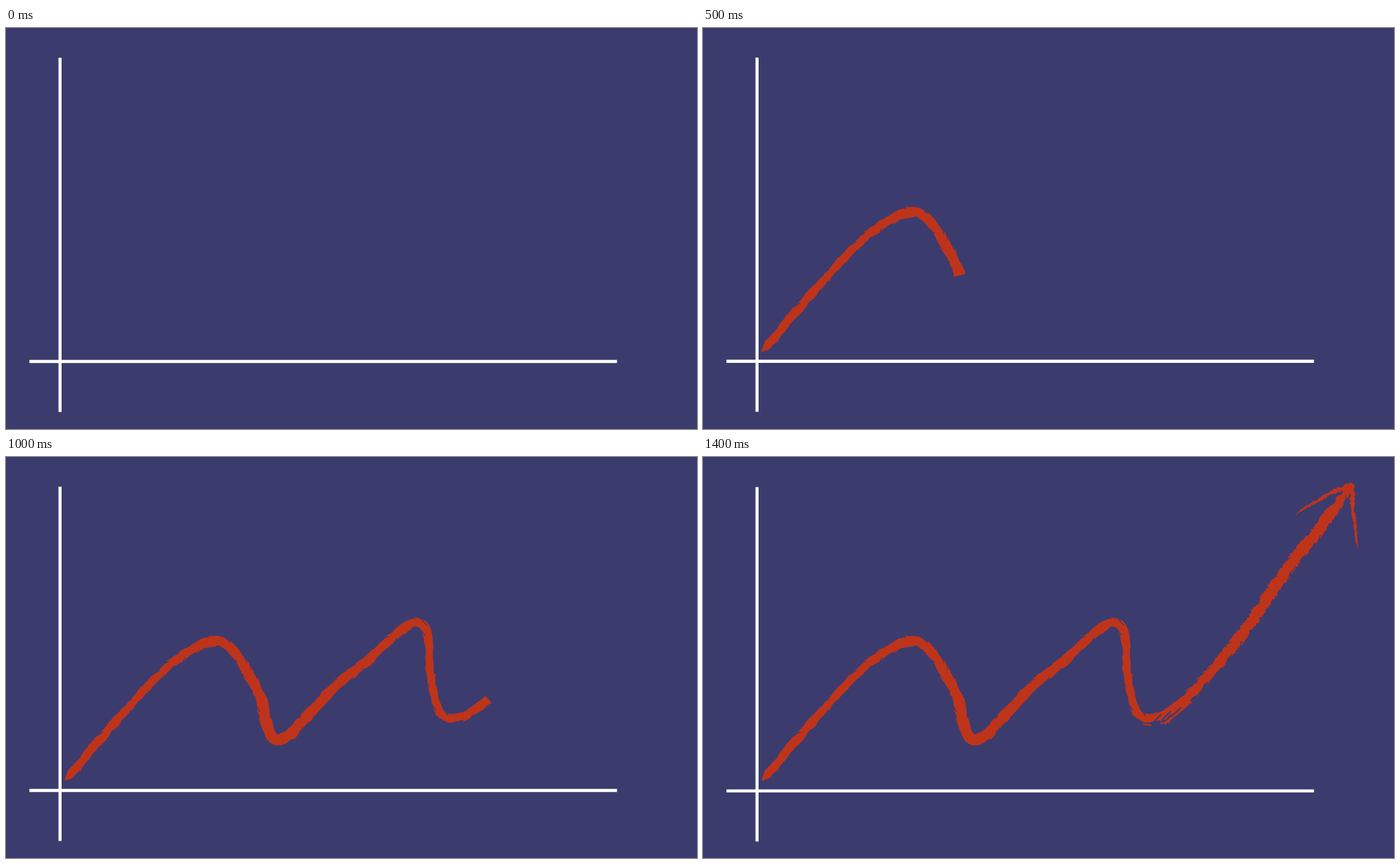
An HTML page with a canvas for the animation above (1500 ms loop, 982x570 px).

```html
<!DOCTYPE html>
<html lang="en">
<head>
<meta charset="utf-8">
<title>Rising chart</title>
<style>
  html, body { margin: 0; width: 100%; height: 100%; overflow: hidden; background: #3c3b6e; }
  canvas { display: block; }
</style>
</head>
<body>
<canvas id="stage" width="982" height="570"></canvas>
<script>
const ctx = document.getElementById('stage').getContext('2d');
const BG = '#3c3b6e', RED = '#be341b';
const STEP = 100, STEPS = 15;

const CURVE = `M84 460 C162 370 242 264 300 261 C322 261 344 303 362 344
  C371 372 371 403 387 403 C404 403 440 350 480 315 C512 296 558 242 579 236
  C612 227 595 300 607 330 C613 362 618 372 636 372 C668 368 702 328 738 287
  C790 226 812 176 871 109 L923 38`;
const BARBS = ['M923 39 Q878 55 842 82', 'M922 39 Q923 85 931 131'];
// Step number and the x that the brush has reached by then
const STOPS = [[1, 85], [2, 155], [5, 364], [8, 570], [11, 763], [13, 873], [14, 923]];

const random = n => {
  const v = Math.sin(n * 12.9898) * 43758.5453;
  return v - Math.floor(v);
};
const noise = n => {
  const i = Math.floor(n), f = n - i;
  return random(i) * (1 - f) + random(i + 1) * f - .5;
};

// Samples a path every 2 px; widthAt(length, total) gives half the brush width
function buildStroke(d, widthAt) {
  const path = document.createElementNS('http://www.w3.org/2000/svg', 'path');
  path.setAttribute('d', d);
  const total = path.getTotalLength(), samples = [];
  for (let length = 0, i = 0; length <= total; length += 2, i++) {
    const { x, y } = path.getPointAtLength(length);
    const a = path.getPointAtLength(length - 2), b = path.getPointAtLength(length + 2);
    const dist = Math.hypot(b.x - a.x, b.y - a.y);
    const w = widthAt(length, total), rough = x > 740 ? 3.5 : .8;
    const edge = [0, 500].map(seed =>
      Math.max(.3, w + noise(i / 4 + seed) * Math.min(2.4, w) + (random(i + seed) - .5) * Math.min(rough, w)));
    samples.push({ x, y, w, edge, length, nx: (a.y - b.y) / dist, ny: (b.x - a.x) / dist });
  }
  return samples;
}

const brushWidth = (length, total) =>
  Math.min(1 + length * .4, 6.8 + 1.2 * Math.cos((length - 480) / 111), 3 + (total - length) * .1);
const barbWidth = (length, total) => 3.6 * (1 - length / total) ** .6;

const main = buildStroke(CURVE, brushWidth);
const barbs = BARBS.map(d => buildStroke(d, barbWidth));
const lengthAtX = x => (main.find(s => s.x >= x) || main[main.length - 1]).length;

function line(x1, y1, x2, y2, width, color) {
  ctx.strokeStyle = color;
  ctx.lineWidth = width;
  ctx.beginPath();
  ctx.moveTo(x1, y1);
  ctx.lineTo(x2, y2);
  ctx.stroke();
}

const offset = (s, side, r) => [s.x + side * s.nx * r, s.y + side * s.ny * r];

function drawStroke(samples) {
  ctx.fillStyle = RED;
  ctx.beginPath();
  samples.forEach(s => ctx.lineTo(...offset(s, 1, s.edge[0])));
  [...samples].reverse().forEach(s => ctx.lineTo(...offset(s, -1, s.edge[1])));
  ctx.fill();
}

// Loose hairs and small nicks along both edges, denser where the brush runs dry
function drawBristles(samples) {
  for (let i = 12; i < samples.length - 6; i += 3) {
    const a = samples[i], b = samples[i + 3 + Math.floor(random(i) * 3)];
    if (random(i + 90) > (a.x > 690 ? .7 : .35)) continue;
    const side = random(i + 40) < .5 ? -1 : 1;
    if (random(i + 70) < .6) line(...offset(a, side, a.w + 1.2), ...offset(b, side, b.w - .5), 1.5, RED);
    else line(...offset(a, side, a.w + 1), ...offset(b, side, b.w - 2), 1.2, BG);
  }
}

// The brush splits into strands at the second trough
function drawSplit() {
  line(625, 380, 637, 381, 2, RED);
  line(650, 379, 664, 376, 2, RED);
  line(656, 379, 694, 348, 3.5, RED);
  for (let k = 0; k < 4; k++) {
    const x = 638 + 14 * k, y = 379 - 5 * k;
    line(x, y, x + 13, y - 13, 2, BG);
  }
}

function reachAt(step) {
  const k = Math.max(1, STOPS.findIndex(s => s[0] >= step));
  const [[s0, x0], [s1, x1]] = [STOPS[k - 1], STOPS[k]];
  const from = lengthAtX(x0);
  return from + (lengthAtX(x1) - from) * (step - s0) / (s1 - s0);
}

function draw(step) {
  ctx.fillStyle = BG;
  ctx.fillRect(0, 0, 982, 570);
  const dy = .4 + .4 * Math.cos((step - 2) * Math.PI / 3);
  line(76.8, 42 + dy, 76.8, 545.6 + dy, 4.4, '#fff');
  line(33.3, 473.8 + dy, 868.3, 473.8 + dy, 4.4, '#fff');
  if (!step) return;

  const reach = reachAt(step);
  const shown = main.filter(s => s.length <= reach);
  drawStroke(shown);
  drawBristles(shown);
  if (reach > lengthAtX(700)) drawSplit();
  if (step === STEPS - 1) barbs.forEach(drawStroke);
}

function tick() {
  draw(Math.floor(performance.now() / STEP) % STEPS);
  requestAnimationFrame(tick);
}
tick();
</script>
</body>
</html>
```
